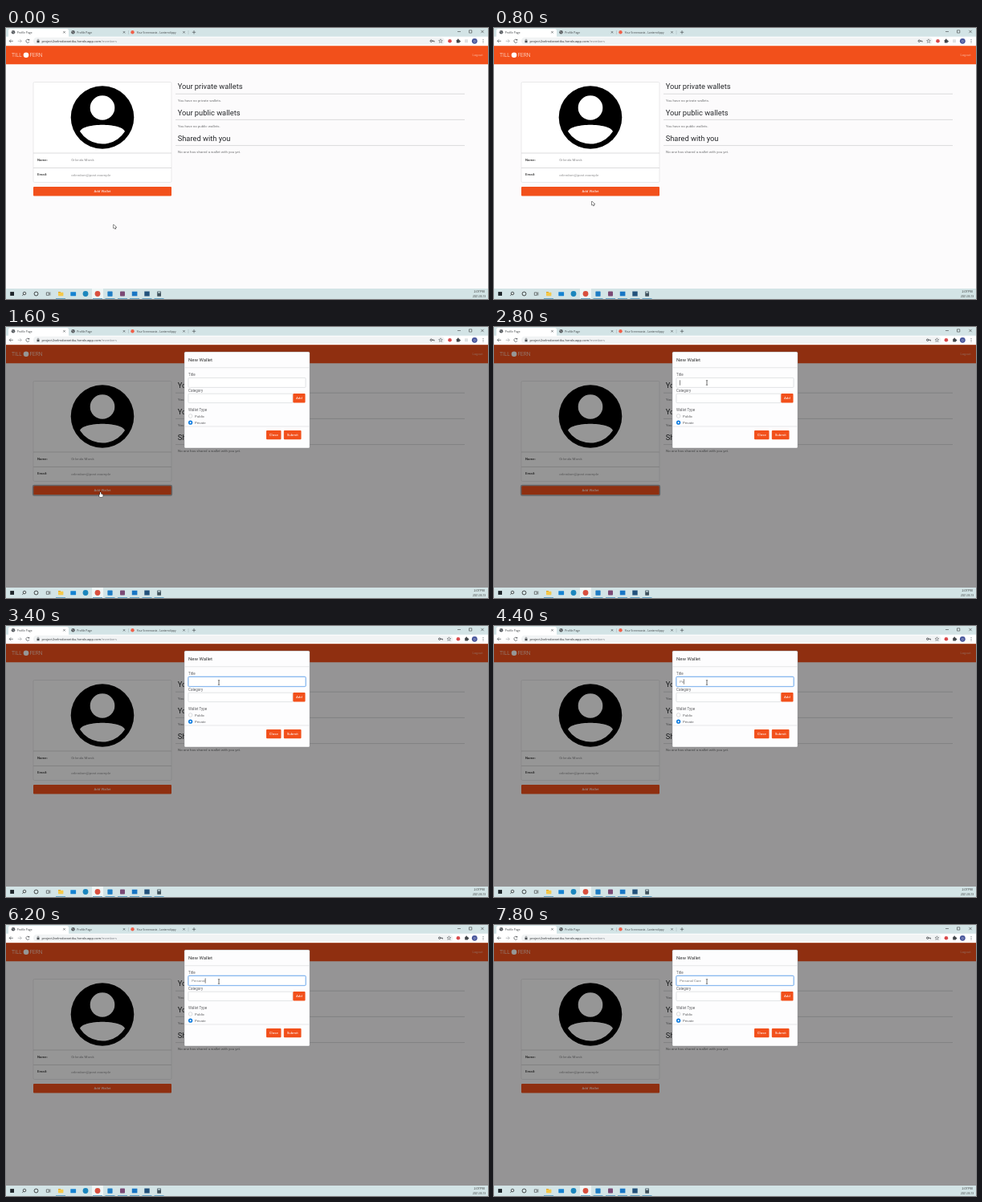
An HTML page with a canvas that plays this animation: 600 by 338 pixels, repeating every 8000 ms.

```html
<!DOCTYPE html>
<html lang="en">
<head>
<meta charset="utf-8">
<title>Profile Page</title>
<style>
html, body { margin: 0; width: 100%; height: 100%; overflow: hidden; background: #fcfbfc; }
canvas { display: block; width: 600px; height: 338px; }
</style>
</head>
<body>
<canvas id="stage"></canvas>
<script>
const W = 600, H = 338, LOOP = 8000, STEP = 200;
const ORANGE = '#f2501b', BAR = '#d3e4e6', INK = '#3c4043', BLUE = '#0d7be0';
const SITE = 'Roboto, sans-serif', UI = '"Open Sans", "Noto Sans", sans-serif';
const canvas = document.getElementById('stage');
const c = canvas.getContext('2d');
const dpr = window.devicePixelRatio || 1;
canvas.width = W * dpr;
canvas.height = H * dpr;

function text(s, x, y, size, color, { font = SITE, weight = 400, align = 'left' } = {}) {
  c.font = `${weight} ${size}px ${font}`;
  c.fillStyle = color;
  c.textAlign = align;
  c.fillText(s, x, y);
  return c.measureText(s).width;
}

function box(x, y, w, h, fill, r = 0, stroke, lw = 0.6) {
  c.beginPath();
  c.roundRect(x, y, w, h, r);
  if (fill) { c.fillStyle = fill; c.fill(); }
  if (stroke) { c.strokeStyle = stroke; c.lineWidth = lw; c.stroke(); }
}

function dot(x, y, r, fill, stroke, lw = 0.7) {
  c.beginPath();
  c.arc(x, y, r, 0, Math.PI * 2);
  if (fill) { c.fillStyle = fill; c.fill(); }
  if (stroke) { c.strokeStyle = stroke; c.lineWidth = lw; c.stroke(); }
}

function line(points, color, lw = 0.7) {
  c.beginPath();
  points.forEach(([x, y], i) => i ? c.lineTo(x, y) : c.moveTo(x, y));
  c.strokeStyle = color;
  c.lineWidth = lw;
  c.stroke();
}

function cross(x, y, r, color, lw) {
  line([[x - r, y - r], [x + r, y + r]], color, lw);
  line([[x + r, y - r], [x - r, y + r]], color, lw);
}

function button(label, x, y, w, h, size = 4.4) {
  box(x, y, w, h, ORANGE, 1);
  text(label, x + w / 2, y + h / 2 + 1.5, size, '#fff', { align: 'center' });
}

function globe(x, y) {
  dot(x, y, 2.3, '#54585c');
  line([[x - 1.7, y - 0.7], [x + 0.3, y - 0.2], [x + 1.2, y + 1.2]], '#c5cacd', 0.6);
}

function drawTabs() {
  box(0, 0, W, 11, BAR);
  box(3, 1, 75, 12, '#fff', 2.5);
  globe(9, 5.3);
  globe(83.5, 5.3);
  dot(157.5, 5.3, 2.2, '#f0604a');
  text('Profile Page', 13.8, 6.6, 3.4, INK, { font: UI });
  text('Profile Page', 88.3, 6.6, 3.4, INK, { font: UI });
  text('Your Screencasts - Lanternclippy', 162.8, 6.6, 3.25, INK, { font: UI });
  for (const x of [72.5, 147, 221.5]) cross(x, 5.3, 1.2, INK, 0.6);
  line([[152.5, 3], [152.5, 8]], '#9aa8ab', 0.4);
  line([[227, 3], [227, 8]], '#9aa8ab', 0.4);
  line([[231.8, 5.3], [236.2, 5.3]], INK, 0.6);
  line([[234, 3.1], [234, 7.5]], INK, 0.6);
  line([[562, 4.5], [566, 4.5]], '#222', 0.5);
  box(576.5, 2.8, 3.3, 3.3, null, 0, '#222', 0.5);
  cross(593, 4.5, 1.7, '#222', 0.5);
}

function arrow(x, y, dir, color) {
  line([[x - 2.3, y], [x + 2.3, y]], color);
  line([[x + dir * 0.3, y - 2], [x + dir * 2.3, y], [x + dir * 0.3, y + 2]], color);
}

function star(x, y, r) {
  const pts = [];
  for (let i = 0; i <= 10; i++) {
    const a = -Math.PI / 2 + i * Math.PI / 5, q = i % 2 ? r * 0.45 : r;
    pts.push([x + q * Math.cos(a), y + q * Math.sin(a)]);
  }
  line(pts, '#4b4f53', 0.5);
}

function drawToolbar(t) {
  const shift = t >= 2200 ? 10.4 : 0;
  box(0, 10.7, W, 11.6, '#fff');
  arrow(6.5, 16.3, -1, '#4b4f53');
  arrow(17, 16.3, 1, '#a5a9ac');
  c.beginPath();
  c.arc(27, 16.3, 2.1, 0.4, 5.6);
  c.strokeStyle = '#4b4f53';
  c.lineWidth = 0.7;
  c.stroke();
  box(27.7, 14.1, 1.5, 1.4, '#4b4f53');
  box(34, 11.8, 512 + shift, 9, '#f1f3f4', 4.5);
  box(38.5, 15.8, 3, 2.4, '#4b4f53', 0.3);
  box(39.1, 14.1, 1.8, 2.4, null, 0.8, '#4b4f53', 0.5);
  const w = text('project2velmdorantiku.herokuapp.com', 44.5, 17.9, 4.05, '#26292c', { font: UI });
  text('/members', 44.5 + w, 17.9, 4.05, '#777b80', { font: UI });

  dot(529.3 + shift, 16.2, 1.2, null, '#33373a', 0.8);
  line([[530.4 + shift, 16.2], [533 + shift, 16.2], [533 + shift, 17.5]], '#33373a', 0.8);
  star(541 + shift, 16.3, 2.5);
  dot(552.5 + shift, 16.3, 2.3, '#d9494b');
  box(560.8 + shift, 14.8, 3.9, 3.7, '#43474b', 0.4);
  dot(562.8 + shift, 14.5, 0.9, '#43474b');
  dot(565 + shift, 16.6, 0.9, '#43474b');
  if (!shift) box(571, 14.3, 4, 4, '#dfe2e4', 0.5);
  dot(583.3, 16.3, 3.4, '#47559b');
  text('O', 583.3, 17.5, 3.4, '#fff', { font: UI, align: 'center' });
  for (const d of [-1.7, 0, 1.7]) dot(594, 16.3 + d, 0.5, '#4b4f53');
}

function drawAvatar(x, y) {
  dot(x, y, 39.3, '#000');
  dot(x, y - 12, 15.3, '#fff');
  c.beginPath();
  c.arc(x, y, 33, 0.56, Math.PI - 0.56);
  c.bezierCurveTo(x - 26, y + 12, x - 12, y + 9.3, x, y + 9.3);
  c.bezierCurveTo(x + 12, y + 9.3, x + 26, y + 12, x + 28, y + 17.5);
  c.fillStyle = '#fff';
  c.fill();
}

function drawPage(t) {
  box(0, 22, W, 303, '#fcfbfc');
  box(0, 22.3, W, 23, ORANGE);
  text('TILL', 7, 36.2, 6.6, '#fff', { weight: 300 });
  dot(25, 33.8, 3.3, '#fff');
  text('FERN', 29.5, 36.2, 6.4, '#fff', { weight: 300 });
  text('Logout', 593.5, 35.3, 4.2, 'rgba(255,255,255,.55)', { align: 'right' });

  box(34, 67.5, 172, 125, '#fff', 1.5, '#dcdcde');
  for (const y of [156, 174.5]) line([[34, y], [206, y]], '#d3d3d5', 0.8);
  drawAvatar(120, 111.5);
  const rows = [['Name:', 'Orlenda Marsk'], ['Email:', 'orlendam@post.example']];
  rows.forEach(([label, value], i) => {
    text(label, 39, 166 + i * 18.4, 4.4, '#333', { weight: 500 });
    text(value, 81.3, 166.4 + i * 18.4, 4.4, '#909092');
  });
  button('Add Wallet', 34, 198, 172, 11.5);
  if (t >= 1600 && t < 3000) box(33.6, 197.4, 172.8, 12.7, null, 1.5, '#a9abb0', 1.5);

  const groups = [
    ['Your private wallets', 'You have no private wallets.'],
    ['Your public wallets', 'You have no public wallets.'],
    ['Shared with you', 'No one has shared a wallet with you yet.']
  ];
  groups.forEach(([head, note], i) => {
    const y = 76.4 + i * 32.2;
    text(head, 213.7, y, 9.3, '#26282b');
    line([[211, y + 5.8], [571, y + 5.8]], '#d2d2d4', 0.8);
    text(note, 214, y + 15.5, 4.4, '#707173');
  });
}

// Time at which each number of letters of the title is on screen.
const typing = [[4200, 1], [4400, 2], [4600, 4], [4800, 5], [5000, 6], [5200, 7], [5400, 8],
  [6600, 9], [6800, 10], [7000, 12], [7200, 13]];

function typed(t) {
  let n = 0;
  for (const [at, count] of typing) if (t >= at) n = count;
  return 'Personal Care'.slice(0, n);
}

function caretOn(t) {
  return t >= 2800 && !(t >= 3400 && t < 4000) && !(t >= 5800 && t < 6200) && t < 7800;
}

function drawModal(t) {
  c.fillStyle = 'rgba(0,0,0,.41)';
  c.fillRect(0, 22.3, W, 302.7);
  box(222, 31, 156, 120, '#fdfdfe', 1.5, '#8b8b8d', 0.4);
  text('New Wallet', 227, 43.2, 6, '#333');
  line([[222, 50.7], [378, 50.7]], '#dcdde0');
  line([[222, 124], [378, 124]], '#dcdde0');
  text('Title', 227, 61, 4.5, '#5d5e61');
  text('Category', 227, 80.7, 4.5, '#5d5e61');
  text('Wallet Type', 227, 105, 4.5, '#5d5e61');

  if (t >= 3000) {
    box(227, 63.4, 146, 12, null, 1.5, '#bcd8f8', 1.8);
    box(227, 63.4, 146, 12, '#fff', 1, '#6ba6ea', 0.8);
  } else {
    box(227, 63.4, 146, 12, '#fff', 1, '#cfd2d6');
  }
  const w = text(typed(t), 231.2, 71, 4.25, '#77797c');
  if (caretOn(t)) line([[231.5 + w, 66.3], [231.5 + w, 72.7]], '#333', 0.6);

  box(227, 83.2, 130, 11.4, '#fff', 1, '#cfd2d6');
  button('Add', 357.3, 83, 15.2, 11.6);
  dot(229.6, 111, 2.3, '#fff', '#b5b8bc', 0.5);
  dot(229.6, 119.2, 2.6, BLUE);
  dot(229.6, 119.2, 1, '#fff');
  text('Public', 235, 112.7, 4.4, '#5d5e61');
  text('Private', 235, 120.8, 4.4, '#5d5e61');
  button('Close', 324, 129, 18.5, 11.2);
  button('Submit', 345.8, 129, 21.7, 11.2);
}

function drawTaskbar() {
  const y = 331.5;
  box(0, 325, W, 13, BAR);
  box(107, 325, 14, 13, '#eef6f6');
  box(5.2, y - 2.4, 4.8, 4.8, '#1d2429');
  dot(23, y - 0.5, 1.8, null, '#222');
  line([[21.7, y + 0.8], [20.3, y + 2.3]], '#222');
  dot(37.5, y, 2.4, null, '#222', 0.8);
  box(50.3, y - 1.6, 3.2, 3.4, null, 0, '#333', 0.6);
  line([[54.9, y - 2], [54.9, y + 2]], '#333', 0.6);
  box(65, y - 2.5, 3, 2, '#d99a25');
  box(65, y - 1.8, 6.4, 4.5, '#f5c84a', 0.4);
  box(80.3, y - 2.3, 6.8, 5, '#1683d2', 0.4);
  dot(99, y, 3.4, '#1b86bd');
  dot(114, y, 3.4, '#d9503f');
  box(126.4, y - 3, 6.2, 6.2, '#1f7cc4', 0.6);
  box(142, y - 3, 6, 6, '#7b4a75', 0.8);
  box(156.8, y - 2.8, 6.6, 5.6, '#1976c5');
  box(172.3, y - 3, 6.4, 6, '#23527c');
  box(188.2, y - 3, 4.8, 6.2, '#40525d', 0.4);
  box(189, y - 2.3, 3.2, 1.4, '#c5d7dd');
  for (const x of [68, 114, 129.5, 145, 160, 175.5, 190.5]) {
    box(x - 6, 337.2, 12, 0.8, '#4a93bd');
  }
  text('2:07 PM', 589, 330.3, 3.5, '#222', { font: UI, align: 'center' });
  text('2021-03-13', 589, 336.2, 3.1, '#222', { font: UI, align: 'center' });
}

const ease = p => p * p * (3 - 2 * p);
const part = (t, a, b) => ease(Math.min(1, Math.max(0, (t - a) / (b - a))));

function pointer(t) {
  const a = part(t, 0, 1200), b = part(t, 1600, 2600);
  const x = 134 - 16.3 * a + 147.3 * b;
  const y = 245 - 39 * a - 136.5 * b + (t >= 3000 ? 1 : 0);
  const shape = t >= 2400 ? 'beam' : t <= 1600 && y < 209.5 ? 'hand' : 'arrow';
  return { x, y, shape };
}

function drawPointer(t) {
  const { x, y, shape } = pointer(t);
  c.save();
  c.translate(x, y);
  if (shape === 'beam') {
    line([[0, -2.7], [0, 2.7]], '#111', 0.6);
    for (const d of [-2.8, 2.8]) line([[-1.2, d], [1.2, d]], '#111', 0.5);
  } else {
    c.beginPath();
    if (shape === 'hand') {
      c.roundRect(-0.7, 0, 1.3, 4, 0.6);
      c.roundRect(-1.5, 2.4, 4.4, 3.8, 1);
    } else {
      [[0, 0], [0, 5], [1.1, 4], [1.9, 5.8], [2.7, 5.4], [1.9, 3.7], [3.5, 3.6]]
        .forEach(p => c.lineTo(...p));
      c.closePath();
    }
    c.strokeStyle = '#111';
    c.lineWidth = 0.9;
    c.stroke();
    c.fillStyle = '#fff';
    c.fill();
  }
  c.restore();
}

function frame(now) {
  const t = Math.floor((now % LOOP) / STEP) * STEP;
  c.setTransform(dpr, 0, 0, dpr, 0, 0);
  drawTabs();
  drawToolbar(t);
  drawPage(t);
  if (t >= 1600) drawModal(t);
  drawTaskbar();
  drawPointer(t);
  requestAnimationFrame(frame);
}
requestAnimationFrame(frame);
</script>
</body>
</html>
```
